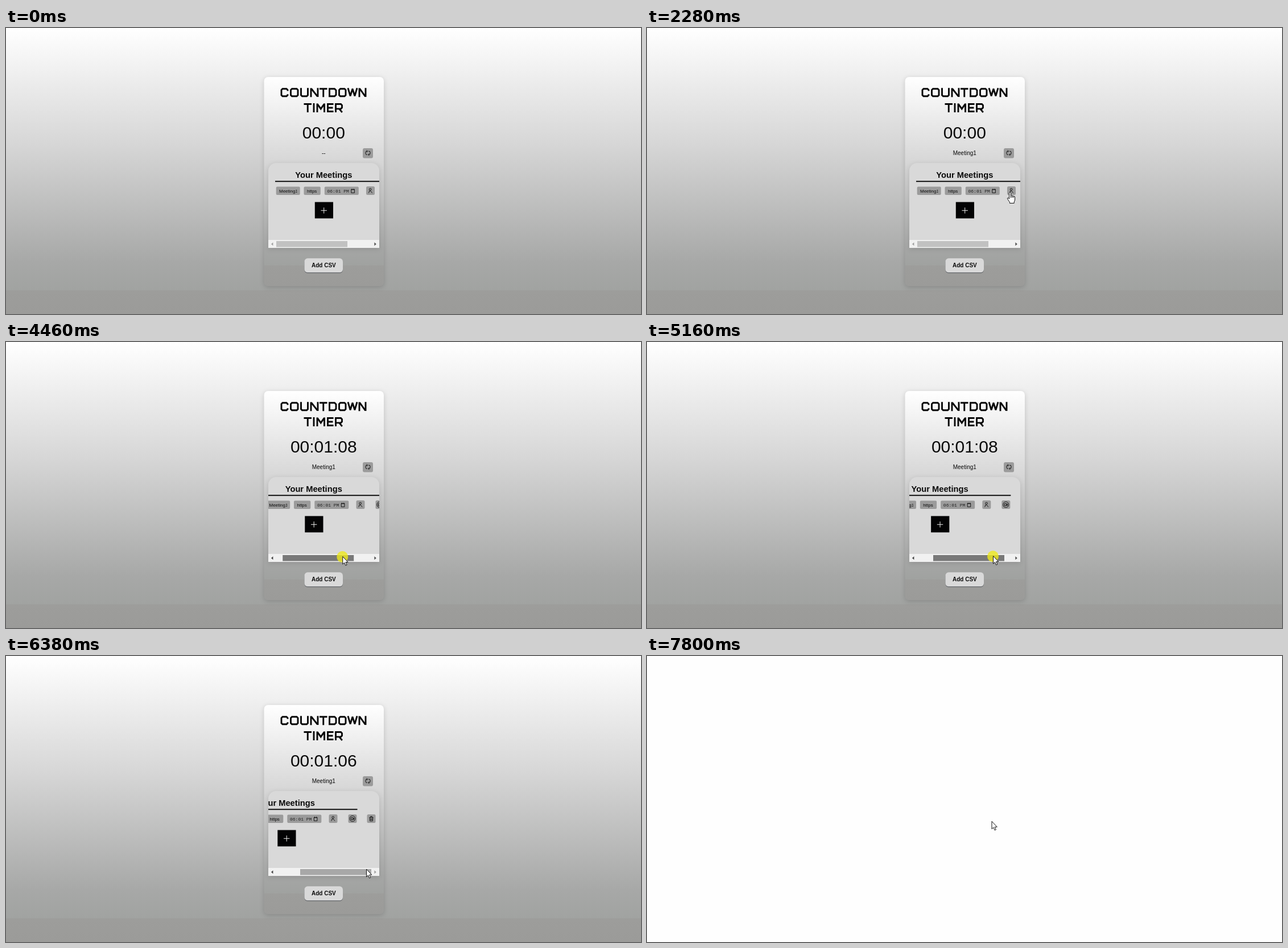
Write an HTML page that moves like this. It is 1116x502 px and loops after 8000 ms.

```html
<!DOCTYPE html>
<html lang="en">
<head>
<meta charset="utf-8">
<title>Countdown Timer</title>
<style>
  html, body { margin: 0; width: 100%; height: 100%; overflow: hidden; background: #fefefe; }
  svg { display: block; width: 100vw; height: 100vh; }
  text { font-family: "Liberation Sans", Arial, sans-serif; fill: #0a0a0a; white-space: pre; }
  .mid { text-anchor: middle; }
  .bold { font-weight: 700; }
  .mono { font-family: "Liberation Mono", "Courier New", monospace; fill: #222; }
  .chip { fill: #9b9b9b; }
  .icon { fill: none; stroke: #151515; stroke-width: 1; }
  .card { filter: drop-shadow(0 2px 4px rgba(0, 0, 0, .16)); }
  .panel { filter: drop-shadow(0 2px 4px rgba(0, 0, 0, .12)); }
  .title { fill: none; stroke: #090909; stroke-width: 2.9; stroke-miterlimit: 3; }
  .cursor path { fill: #fff; stroke: #111; stroke-width: 1; stroke-linejoin: round; }
</style>
</head>
<body>
<svg viewBox="0 0 1116 502" preserveAspectRatio="none">
  <defs>
    <linearGradient id="pageFill" x2="0" y2="1">
      <stop offset="0" stop-color="#fff"/>
      <stop offset=".4" stop-color="#d7d7d7"/>
      <stop offset=".82" stop-color="#a7a8a7"/>
      <stop offset=".916" stop-color="#a1a3a1"/>
      <stop offset=".918" stop-color="#9d9d9b"/>
      <stop offset="1" stop-color="#9b9b99"/>
    </linearGradient>
    <linearGradient id="cardFill" x2="0" y2="1">
      <stop offset="0" stop-color="#fff"/>
      <stop offset=".4" stop-color="#d7d7d7"/>
      <stop offset=".82" stop-color="#a5a6a5"/>
      <stop offset=".9" stop-color="#a0a2a0"/>
      <stop offset=".903" stop-color="#9d9d9b"/>
      <stop offset="1" stop-color="#9b9b99"/>
    </linearGradient>
    <clipPath id="panelClip"><path d="M461 386V251a14 14 0 0 1 14-14H642a14 14 0 0 1 14 14V386Z"/></clipPath>
    <clipPath id="nameClip"><rect x="479" y="278" width="32.5" height="16"/></clipPath>
  </defs>

  <g id="page">
    <rect width="1116" height="502" fill="url(#pageFill)"/>
    <rect class="card" x="453.5" y="86" width="210.5" height="367" rx="7" fill="url(#cardFill)"/>
    <g class="title" id="title" role="img" aria-label="Countdown Timer"></g>

    <text class="mid" id="clock" x="558.3" y="193.5" font-size="30"></text>
    <text class="mid" id="current" x="558.3" y="222.5" font-size="10"></text>

    <rect class="chip" x="627" y="211" width="18" height="17.5" rx="3"/>
    <path class="icon" stroke-width="1.2" d="M635 222.3h-1a2 2 0 0 1-2-2v-2a2 2 0 0 1 2-2h1M637 216.3h1a2 2 0 0 1 2 2v2a2 2 0 0 1-2 2h-1M633.7 214.6l1.8 1.7-1.8 1.7M638.3 220.6l-1.8 1.7 1.8 1.7"/>

    <path class="panel" fill="#d9d9d9" d="M461 386V251a14 14 0 0 1 14-14H642a14 14 0 0 1 14 14V386Z"/>
    <g clip-path="url(#panelClip)">
      <g id="content">
        <text class="mid bold" x="558.3" y="263" font-size="14.7">Your Meetings</text>
        <rect x="473" y="268.3" width="210" height="1.9" fill="#080808"/>

        <rect class="chip" x="474.7" y="278.5" width="42" height="14.5" rx="2"/>
        <text x="480" y="288.7" font-size="8" clip-path="url(#nameClip)">Meeting1</text>
        <rect class="chip" x="523.5" y="278.5" width="29.3" height="14.5" rx="2"/>
        <text x="529" y="288.7" font-size="8">https</text>
        <rect class="chip" x="559.8" y="278.5" width="60" height="14.5" rx="2"/>
        <text class="mono" x="564.5" y="288.7" font-size="8">06:01 PM</text>
        <path class="icon" d="M606.8 283.5h5.6v5.8h-5.6zM606.5 283.7h6.2M608 282v1.5M611.2 282v1.5"/>

        <rect class="chip" x="633" y="278" width="15" height="15" rx="2.5"/>
        <path class="icon" d="M637.2 289.6l1.6-3.2M643.6 289.6l-3-3.6M638 286.6l2.6-1.2"/>
        <circle class="icon" cx="640.2" cy="283.3" r="1.8"/>
        <rect class="chip" x="667" y="278" width="15" height="15" rx="2.5"/>
        <circle class="icon" cx="674.4" cy="285.5" r="5"/>
        <path class="icon" d="M671.8 283.8h3.6v3.6h-3.6zM675.4 285l1.8-1v3.2l-1.8-1"/>
        <rect class="chip" x="700" y="278" width="15" height="15" rx="2.5"/>
        <path class="icon" stroke-width=".9" d="M704 283.4h7M706.2 283v-1.4h2.6v1.4M704.8 283.8l.4 5.8h4.6l.4-5.8M706.6 285v3.2M708.4 285v3.2"/>

        <rect x="542.8" y="305.5" width="32.2" height="28.7" fill="#030304"/>
        <path d="M553.5 320.3h10.4M558.7 315.1v10.4" stroke="#eee" fill="none"/>
      </g>
      <rect x="461" y="372" width="195" height="14" fill="#f1f1f1"/>
      <path id="back" d="M469.4 376.2v6l-3.4-3z"/>
      <path id="forward" d="M647.4 376.2v6l3.4-3z"/>
      <rect id="thumb" x="475" y="374" width="125" height="10.5"/>
    </g>

    <rect x="524.5" y="405.3" width="67.5" height="25" rx="5.5" fill="#65686c"/>
    <rect x="524.5" y="404.3" width="67.5" height="24.8" rx="5.5" fill="#d9d9d9"/>
    <text class="mid bold" x="558.4" y="420.2" font-size="10">Add CSV</text>
  </g>

  <g id="pointer" class="cursor">
    <circle id="press" r="10" cy=".7" fill="#eee81e" fill-opacity=".8"/>
    <path id="arrow" d="M.5.2V13.6L3.5 10.9 5.6 15.8 7.8 14.8 5.7 10.1H9.8Z"/>
    <path id="hand" d="M-1.4 12V1.4Q-1.2.3 0 .3T1.4 1.4V6.4Q2.6 5.4 3.9 6.8 5.2 6 6.2 7.4 8.6 6.8 8.6 9V13Q8.6 15.2 7.2 17V19.5H-.6V17.6L-4.2 12.4Q-5.2 10.6-3.8 10-2.6 9.8-1.4 12ZM1.4 6.4V10M3.9 6.8V10M6.2 7.4V10"/>
  </g>
</svg>
<script>
const $ = id => document.getElementById(id);
const LOOP = 8000, STEP = 70, MAX_THUMB = 42, MAX_SCROLL = 65.5;

// Centre lines of the angular capitals: w is the width, 13 the height.
const glyphs = {
  C: w => `M${w} 3.6V2L${w - 2} 0H2L0 2V11L2 13H${w - 2}L${w} 11V9.4`,
  O: w => `M2 0H${w - 2}L${w} 2V11L${w - 2} 13H2L0 11V2Z`,
  U: w => `M0-1.5V11L2 13H${w - 2}L${w} 11V-1.5`,
  N: w => `M0 14.5V.2H1L${w - 1} 12.8H${w}V-1.5`,
  T: w => `M-1.5 0H${w + 1.5}M${w / 2} 0V14.5`,
  D: w => `M0 0H${w - 2.5}L${w} 2.5V10.5L${w - 2.5} 13H0Z`,
  W: w => `M-.5-1.5L3.6 12.6 ${w / 2} 0 ${w - 3.6} 12.6 ${w + .5}-1.5`,
  I: () => 'M0-1.5V14.5',
  M: w => `M0 14.5V.4H.6L${w / 2} 8.4 ${w - .6}.4H${w}V14.5`,
  E: w => `M${w + 1.5} 0H0V13H${w + 1.5}M0 6.5H${w + .5}`,
  R: w => `M0 14.5V0H${w - 2}L${w} 2V6.4L${w - 2} 8.4H0M${w - 5} 8.4L${w + .3} 14.5`
};

// Each line lists the left and right edge of its letters.
function setLine(word, y, edges) {
  return [...word].map((ch, i) => {
    const [left, right] = edges[i];
    return `<path transform="translate(${left + 1.5} ${y})" d="${glyphs[ch](right - left - 3)}"/>`;
  }).join('');
}
$('title').innerHTML =
  setLine('COUNTDOWN', 106.8, [[482.5, 496.5], [499, 514.5], [517, 532], [534.5, 549.5], [551, 564.5],
    [567, 581.5], [584, 598.5], [600, 618], [619.5, 633.5]]) +
  setLine('TIMER', 133.5, [[523.5, 537], [539.5, 542.5], [545.5, 561], [564, 575.5], [578, 592]]);

const path = [
  [590, 1043, 488], [660, 860, 400], [730, 745, 345], [800, 680, 310], [870, 655, 299],
  [1010, 655, 299], [1220, 622, 292], [1360, 638, 283], [1480, 638, 282], [1620, 638, 282],
  [1890, 638, 288], [2610, 638, 288], [2890, 614, 330], [3240, 581, 374], [3310, 579.5, 377],
  [3970, 579.5, 377], [5160, 608, 375.5], [6050, 633, 374], [6380, 633, 374],
  [6800, 615, 320], [7140, 606, 292], [7210, 605.5, 290]
];

const ticks = [3280, 4300, 5330, 6380, 7340];

const between = (t, from, to) => t >= from && t < to;
const show = (id, on) => $(id).setAttribute('visibility', on ? 'inherit' : 'hidden');

function pointerAt(t) {
  const next = path.findIndex(point => point[0] > t);
  if (next < 0) return path[path.length - 1].slice(1);
  if (next === 0) return path[0].slice(1);
  const [t0, x0, y0] = path[next - 1], [t1, x1, y1] = path[next];
  const k = Math.floor((t - t0) / STEP) * STEP / (t1 - t0);
  return [x0 + (x1 - x0) * k, y0 + (y1 - y0) * k];
}

function thumbColor(t) {
  if (between(t, 3720, 6200)) return '#787878';
  return between(t, 3240, 6520) ? '#a8a8a8' : '#c1c1c1';
}

function render(t) {
  const [x, y] = pointerAt(t);
  const dragged = t < 3970 ? 0 : t < 6200 ? Math.max(0, Math.min(MAX_THUMB, x - 580)) : MAX_THUMB;
  const passed = ticks.filter(at => t >= at).length;

  $('clock').textContent = passed ? `00:01:0${10 - passed}` : '00:00';
  $('current').textContent = t < 2150 ? '--' : 'Meeting1';
  $('content').setAttribute('transform', `translate(${-dragged / MAX_THUMB * MAX_SCROLL} 0)`);
  $('thumb').setAttribute('transform', `translate(${dragged} 0)`);
  $('thumb').setAttribute('fill', thumbColor(t));
  $('back').setAttribute('fill', dragged > 0 ? '#404040' : '#a0a0a0');
  $('forward').setAttribute('fill', dragged < MAX_THUMB ? '#505050' : '#a0a0a0');

  const onButton = between(t, 1290, 2680) || between(t, 7130, 7550);
  $('pointer').setAttribute('transform', `translate(${x} ${y})`);
  show('pointer', t >= 590);
  show('hand', onButton);
  show('arrow', !onButton);
  show('press', between(t, 3720, 6200));
  show('page', t < 7800);
}

function frame() {
  render(performance.now() % LOOP);
  requestAnimationFrame(frame);
}
frame();
</script>
</body>
</html>
```
